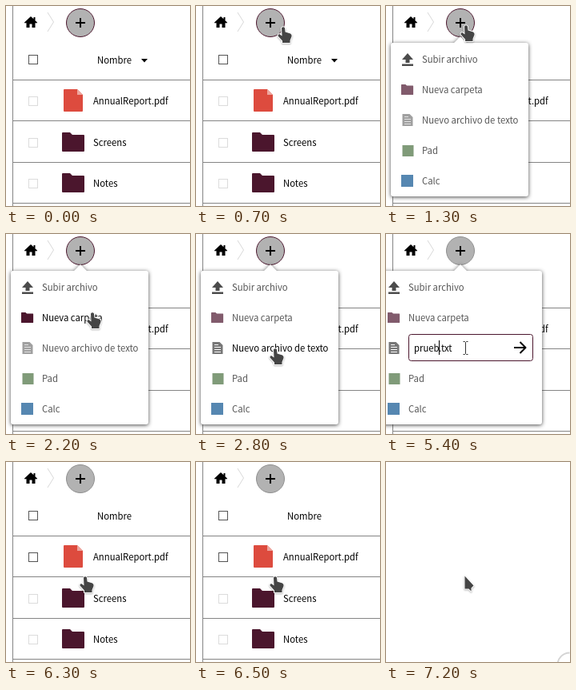
Animation of 230x250 px, one loop 7.4 s. Source, as an HTML page with a canvas:

```html
<!DOCTYPE html>
<html lang="es">
<head>
<meta charset="utf-8">
<title>Archivos</title>
<style>
  html, body { margin: 0; width: 100%; height: 100%; overflow: hidden; background: #fff; }
  canvas { display: block; width: 230px; height: 250px; }
</style>
</head>
<body>
<canvas id="stage"></canvas>
<script>
const LOOP = 7400, W = 230, H = 250;
const FONT = '11.3px "Noto Sans CJK JP", "Noto Sans CJK SC", "Noto Sans CJK", "Noto Sans", sans-serif';
const WINE = '#4b162d', LINE = '#858585', BLUE = '#3daee9';
const canvas = document.getElementById('stage');
const ctx = canvas.getContext('2d');
const dpr = window.devicePixelRatio || 1;
canvas.width = W * dpr;
canvas.height = H * dpr;

function rect(x, y, w, h, color) {
  ctx.fillStyle = color;
  ctx.fillRect(x, y, w, h);
}

function text(s, x, y, color = '#000') {
  ctx.fillStyle = color;
  ctx.fillText(s, x, y);
}

function shape(d, x, y, fill, stroke, width = 1) {
  const path = new Path2D(d);
  ctx.save();
  ctx.translate(x, y);
  ctx.lineWidth = width;
  ctx.lineJoin = 'round';
  if (stroke) { ctx.strokeStyle = stroke; ctx.stroke(path); }
  if (fill) { ctx.fillStyle = fill; ctx.fill(path); }
  ctx.restore();
}

function checkbox(y, dark) {
  ctx.strokeStyle = dark ? '#555' : '#dcdcdc';
  ctx.lineWidth = 1;
  ctx.strokeRect(28.5, y + 0.5, 11, 11);
}

function folder(x, y, s, color) {
  ctx.save();
  ctx.translate(x, y);
  ctx.scale(s, s);
  shape('M1 0H10L13 3H27Q28 3 28 4V23Q28 24 27 24H1Q0 24 0 23V1Q0 0 1 0Z', 0, 0, color);
  ctx.restore();
}

function topBar(wineBorder) {
  shape('M7.5 0L11 3.3V1H13V5.2L15.5 7.6V8.3H13V14H9V9.5H6V14H2V8.3H-.5V7.6Z', 23.5, 13, '#000');
  shape('M0 0L7.5 12L0 24', 52, 8, null, '#d8d8d8');
  ctx.beginPath();
  ctx.arc(93, 21, 17.5, 0, 7);
  ctx.fillStyle = '#b2b2b2';
  ctx.fill();
  ctx.lineWidth = 1;
  ctx.strokeStyle = wineBorder ? WINE : '#8f8f8f';
  ctx.stroke();
  rect(87, 20, 12, 2, '#000');
  rect(92, 15, 2, 12, '#000');
}

function fileList(sorted, hoverFirst) {
  rect(8, 0, 1, H, LINE);
  for (const y of [92, 143, 195, 246]) rect(8, y, W - 8, 1, LINE);
  checkbox(61, true);
  text('Nombre', 114, 72);
  if (sorted) shape('M0 0H8L4 4.5Z', 169, 66, '#000');
  ['AnnualReport.pdf', 'Screens', 'Notes'].forEach((name, i) => {
    const y = 113 + Math.round(i * 51.5);
    checkbox(y, hoverFirst && i === 0);
    text(name, 109, y + 10);
    if (i) folder(70, y - 7, 1, WINE);
  });
  shape('M1 0H17L24 7V27Q24 28 23 28H1Q0 28 0 27V1Q0 0 1 0Z', 72, 104, '#dd4b3e');
  shape('M0 0L7 7H0Z', 89, 104, '#eda59e');
}

const icons = [
  x => shape('M7 0L14 8H9.5V12H4.5V8H0ZM0 13.5H14V16H0Z', x, 59, '#000'),
  x => folder(x - 1, 98, 0.54, WINE),
  x => {
    shape('M0 0H9L13 4V15H0Z', x + 0.5, 135, '#777');
    for (let i = 0; i < 4; i++) rect(x + 3, 138 + i * 3, i ? 8 : 5, 1, '#fff');
  },
  x => rect(x + 0.5, 174, 14, 14, '#4b7140'),
  x => rect(x - 1, 211, 15, 15, '#0f5591')
];
const labels = ['Subir archivo', 'Nueva carpeta', 'Nuevo archivo de texto', 'Pad', 'Calc'];

function menu(left, right, hover, editing) {
  ctx.save();
  ctx.shadowColor = 'rgba(40,40,40,.85)';
  ctx.shadowBlur = 5 * dpr;
  ctx.shadowOffsetY = dpr;
  ctx.beginPath();
  ctx.roundRect(left, 46, right - left, 192, 3);
  ctx.moveTo(84, 47);
  ctx.lineTo(93, 38);
  ctx.lineTo(102, 47);
  ctx.fillStyle = '#fff';
  ctx.fill();
  ctx.restore();

  const shift = editing ? -17 : 0;
  labels.forEach((label, i) => {
    const lit = hover === i;
    ctx.globalAlpha = lit ? 1 : 0.7;
    icons[i](20 + shift);
    ctx.globalAlpha = 1;
    if (!(editing && i === 2)) text(label, 45 + shift, 71 + i * 38, lit ? '#000' : '#555');
  });
}

// Typed part of the name, the extension stays after the caret
const typed = [[4500, 'p'], [4900, 'pr'], [5100, 'pru'], [5300, 'prue'], [5400, 'prueb'], [5600, 'prueba']];

function nameField(t) {
  ctx.beginPath();
  ctx.roundRect(28.5, 125.5, 155, 33, 3);
  ctx.fillStyle = '#fff';
  ctx.fill();
  ctx.strokeStyle = WINE;
  ctx.lineWidth = 1;
  ctx.stroke();
  shape('M0 7H14M7.5 0L14.5 7L7.5 14', 160, 135, null, '#000', 2);

  if (t < 4500) {
    const selected = t >= 3600;
    ctx.save();
    ctx.beginPath();
    ctx.rect(35, 133, 116, 18);
    ctx.clip();
    if (selected) rect(35, 134, 116, 17, BLUE);
    const width = ctx.measureText(labels[2]).width;
    text(labels[2], 151 - width, 147, selected ? '#fff' : '#000');
    ctx.restore();
    return;
  }
  const word = typed.filter(k => t >= k[0]).pop()[1];
  text(word + '.txt', 35, 147);
  const caretOff = (t >= 4700 && t < 4900) || t >= 5900;
  if (!caretOff) rect(Math.round(35 + ctx.measureText(word).width), 133, 1, 18, '#000');
}

const HAND = 'M-2 1.5Q0-1 2 1.5L2.5 6.5L9 8.5Q11 9.5 10.5 12L8.5 17V20H-1V17.5L-6.5 11.5Q-7 9-4.5 9.3L-1.5 11.5Z';
const ARROW = 'M0 0L11 12L8 15V19L5 16H0Z';
const BEAM = 'M-3 0H-1L0 1L1 0H3M0 1V15M-3 16H-1L0 15L1 16H3';

function cursor(kind, x, y) {
  if (kind === 'beam') {
    shape(BEAM, x, y - 8, null, '#fff', 3);
    shape(BEAM, x, y - 8, null, '#333', 1);
    return;
  }
  ctx.save();
  ctx.shadowColor = 'rgba(0,0,0,.3)';
  ctx.shadowBlur = 2 * dpr;
  ctx.shadowOffsetY = dpr;
  shape(kind === 'hand' ? HAND : ARROW, x, y, null, '#fff', 2);
  ctx.restore();
  shape(kind === 'hand' ? HAND : ARROW, x, y, '#454545');
}

// Each leg: first step, last step, from, to
const legs = [
  [200, 800, [222, 52], [100, 24]],
  [1500, 2000, [100, 24], [107, 85]],
  [2000, 2200, [107, 85], [108, 98]],
  [2300, 2800, [108, 98], [99, 143]]
];

function pointer(t) {
  if (t < 200) return null;
  const step = Math.floor(t / 100) * 100;
  const [a, b, from, to] = legs.filter(leg => step >= leg[0]).pop();
  let p = Math.min(1, (step - a) / (b - a));
  if (b === 2200) p = Math.floor(p);
  p = p * p * (3 - 2 * p);
  return from.map((v, i) => v + (to[i] - v) * p);
}

function draw(t) {
  ctx.setTransform(dpr, 0, 0, dpr, 0, 0);
  ctx.font = FONT;
  rect(0, 0, W, H, '#fff');
  const pos = pointer(t);

  if (t >= 7100) {
    if (t >= 7200) {
      ctx.beginPath();
      ctx.arc(229.5, 253.5, 15, Math.PI, Math.PI * 1.5);
      ctx.strokeStyle = '#d4d4d4';
      ctx.lineWidth = 2;
      ctx.stroke();
    }
    cursor('arrow', 98.5, 142.5);
    return;
  }

  fileList(t < 6300, t >= 6300);
  topBar(t < 1100 || (t >= 1300 && t < 3300));

  const open = t >= 1300 && t < 6300;
  const editing = open && t >= 3500;
  if (editing) {
    menu(-9, 195, 2, true);
    nameField(t);
  } else if (open) {
    const hover = pos[1] < 48 ? -1 : Math.floor((pos[1] - 48) / 38);
    menu(6, 178, hover, false);
  }
  if (!pos) return;
  if (editing && t >= 3600) cursor('beam', 99.5, 142.5);
  else cursor(pos[0] > 112 ? 'arrow' : 'hand', ...pos);
}

function tick(now) {
  draw(now % LOOP);
  requestAnimationFrame(tick);
}
draw(0);
requestAnimationFrame(tick);
</script>
</body>
</html>
```
